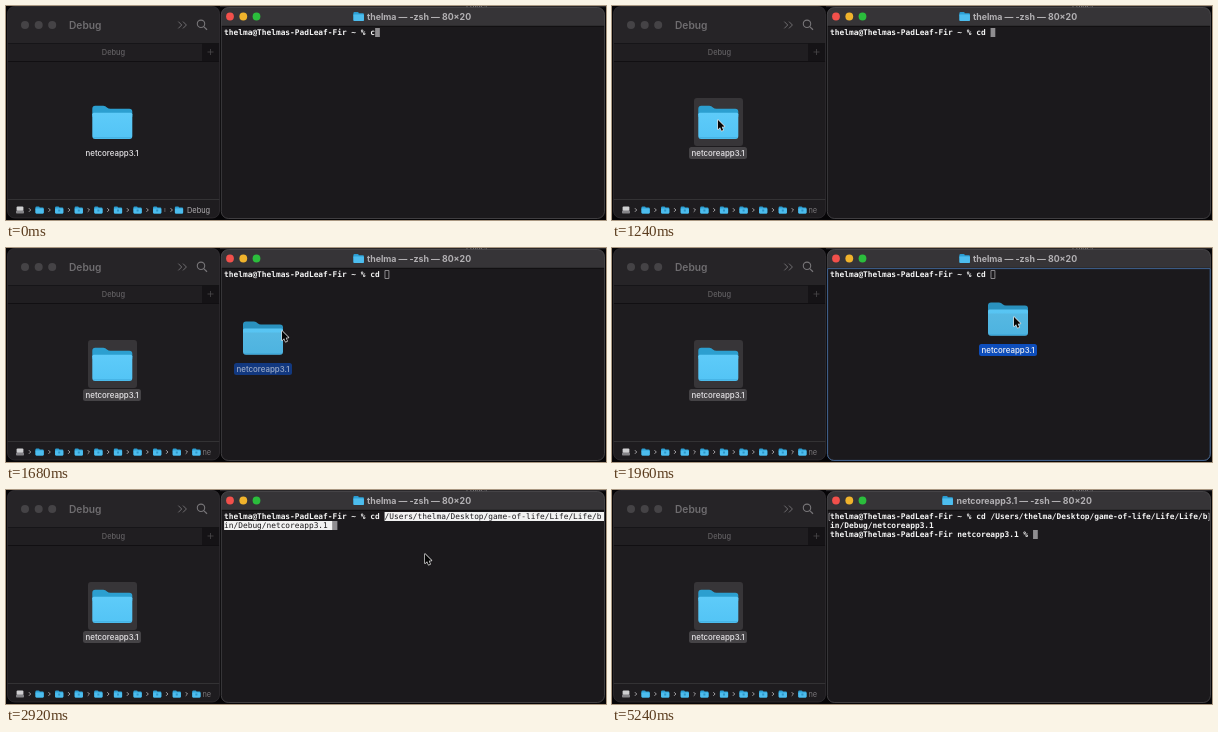
Recreate the animation shown at these times as an HTML page with a canvas. Size 600x214 px, loop 5280 ms.

```html
<!DOCTYPE html>
<html lang="en">
<head>
<meta charset="utf-8">
<title>Drag a folder into the terminal</title>
<style>
  html, body { margin: 0; width: 100%; height: 100%; overflow: hidden; background: #050506; }
  canvas { display: block; width: 600px; height: 214px; }
</style>
</head>
<body>
<canvas id="stage" width="600" height="214"></canvas>
<script>
const ctx = document.getElementById('stage').getContext('2d');
const LOOP = 5280, STEP = 40;
const UI = 'Inter, Roboto, sans-serif';
const MONO = '"DejaVu Sans Mono", "Liberation Mono", monospace';
const CELL = 4.72, ROW = 9, TEXT_X = 218.1, TEXT_Y = 22;

const USER = 'thelma';
const HOST = USER + '@Thelmas-PadLeaf-Fir';
const PROMPT = HOST + ' ~ % ';
const PATH_START = `/Users/${USER}/Desktop/game-of-life/Life/Life/b`;
const PATH_END = 'in/Debug/netcoreapp3.1';
const FOLDER = 'netcoreapp3.1';

// Moments of the story, in ms
const AT = { typeD: 80, typeSpace: 160, pointer: 240, select: 1080, drag: 1320,
             over: 1720, drop: 2440, enter: 3560, prompt: 3640 };

// Keys: [time, x, y]
const POINTER = [[240, 374, 88], [400, 318, 98], [600, 228, 110], [760, 158, 117], [920, 116, 116],
  [1160, 106, 114], [1280, 106, 114], [1400, 128, 110], [1520, 182, 99], [1680, 276, 83],
  [1800, 337, 75], [1960, 402, 69], [2120, 417, 66], [2280, 419, 64]];
const DRAGGED = [[1320, 106, 116], [1400, 117, 114], [1520, 160, 107], [1680, 257, 90],
  [1800, 322, 80], [1960, 396, 71], [2120, 415, 68], [2280, 418, 66]];

const clamp = v => Math.max(0, Math.min(1, v));

function along(keys, t) {
  let i = 0;
  while (i < keys.length - 2 && t > keys[i + 1][0]) i++;
  const [a, b] = [keys[i], keys[i + 1]];
  const u = clamp((t - a[0]) / (b[0] - a[0]));
  return [a[1] + (b[1] - a[1]) * u, a[2] + (b[2] - a[2]) * u];
}

function rect(x, y, w, h, fill) {
  ctx.fillStyle = fill;
  ctx.fillRect(x, y, w, h);
}

function round(x, y, w, h, r, fill, stroke, width = 1) {
  ctx.beginPath();
  ctx.roundRect(x, y, w, h, r);
  if (fill) { ctx.fillStyle = fill; ctx.fill(); }
  if (stroke) { ctx.strokeStyle = stroke; ctx.lineWidth = width; ctx.stroke(); }
}

function dot(x, y, r, fill) {
  ctx.beginPath();
  ctx.arc(x, y, r, 0, Math.PI * 2);
  ctx.fillStyle = fill;
  ctx.fill();
}

function line(points, color, width = 1) {
  ctx.beginPath();
  points.forEach(([x, y]) => ctx.lineTo(x, y));
  ctx.strokeStyle = color;
  ctx.lineWidth = width;
  ctx.stroke();
}

function text(str, x, y, font, color, align = 'left') {
  ctx.font = font;
  ctx.fillStyle = color;
  ctx.textAlign = align;
  ctx.textBaseline = 'alphabetic';
  ctx.fillText(str, x, y);
}

function chevron(x, y, size, color, width = 1) {
  line([[x - size / 2, y - size], [x + size / 2, y], [x - size / 2, y + size]], color, width);
}

function bigFolder(cx, cy) {
  const x = cx - 20, y = cy - 16.5;
  ctx.beginPath();
  ctx.moveTo(x, y + 3);
  ctx.quadraticCurveTo(x, y, x + 3, y);
  ctx.lineTo(x + 11, y);
  ctx.quadraticCurveTo(x + 13, y, x + 15, y + 2);
  ctx.quadraticCurveTo(x + 16, y + 3, x + 18, y + 3);
  ctx.lineTo(x + 37, y + 3);
  ctx.quadraticCurveTo(x + 40, y + 3, x + 40, y + 6);
  ctx.lineTo(x + 40, y + 11);
  ctx.lineTo(x, y + 11);
  ctx.fillStyle = '#2c9fd0';
  ctx.fill();
  const front = ctx.createLinearGradient(0, y + 7, 0, y + 33);
  front.addColorStop(0, '#5ecbf9');
  front.addColorStop(1, '#53c4f5');
  round(x, y + 7, 40, 26.2, [1.5, 1.5, 3, 3], front);
  rect(x + 1, y + 31.8, 38, 0.8, '#3aa6d8');
}

function smallFolder(cx, cy, w = 8.2) {
  const h = w * 0.84, x = cx - w / 2, y = cy - h / 2;
  round(x, y, w * 0.5, h * 0.5, 1, '#2b9bd0');
  round(x, y + h * 0.13, w, h * 0.87, 1, '#2fa3d8');
  round(x, y + h * 0.28, w, h * 0.72, 1, '#4dbdee');
}

function iconLabel(cx, cy, back, color) {
  if (back) round(cx - 29, cy - 6, 58, 12, 2.5, back);
  text(FOLDER, cx, cy + 2.9, `500 7.9px ${UI}`, color, 'center');
}

function drive(x, y) {
  round(x - 3.4, y - 3.6, 6.8, 4.6, 1, '#cfcfd1');
  round(x - 4, y + 0.4, 8, 3.2, 0.8, '#858488');
}

function pathBar(selected) {
  const y = 204, gap = 19.6, grey = '#a5a3a6';
  drive(14, y);
  ctx.save();
  ctx.beginPath();
  ctx.rect(2, 194, 204, 18);
  ctx.clip();
  const folders = selected ? 9 : 7;
  for (let i = 1; i <= folders; i++) {
    const x = 14 + gap * i;
    chevron(x - 9.8, y, 1.8, grey);
    smallFolder(x, y);
    if (i > 1) rect(x - 1, y - 0.5, 2, 2, '#2f94c6');
  }
  const font = `7.4px ${UI}`;
  if (selected) {
    text('ne', 196.5, y + 2.7, font, '#777578');
  } else {
    rect(158.5, y - 2, 0.8, 4, '#6b696c');
    chevron(165.5, y, 1.8, grey);
    smallFolder(173, y);
    text('Debug', 181, y + 2.7, font, '#b0aeb1');
  }
  ctx.restore();
}

function finder(t) {
  const selected = t >= AT.select;
  round(1.5, 0.5, 212, 211.5, 7, '#1e1c1f');
  round(1.5, 0.5, 212, 37, [7, 7, 0, 0], '#262427');
  rect(1.5, 37, 212, 18, '#201e21');
  rect(196, 37, 17.5, 18, '#151316');
  rect(1.5, 37, 212, 0.8, '#151316');
  rect(1.5, 55, 212, 0.8, '#0e0c0f');
  for (const x of [19, 32.7, 46.2]) dot(x, 19, 4, '#454346');
  text('Debug', 63, 22.7, `600 10.2px ${UI}`, '#6f6d70');
  chevron(174, 19, 3.4, '#6f6d70');
  chevron(178.7, 19, 3.4, '#6f6d70');
  ctx.beginPath();
  ctx.arc(195, 17.8, 3.7, 0, Math.PI * 2);
  ctx.strokeStyle = '#777578';
  ctx.lineWidth = 1.1;
  ctx.stroke();
  line([[197.7, 20.6], [201, 23.8]], '#777578', 1.2);
  text('Debug', 107.5, 48.7, `500 7.4px ${UI}`, '#626063', 'center');
  line([[201.5, 46], [207.5, 46]], '#4a484b', 0.8);
  line([[204.5, 43], [204.5, 49]], '#4a484b', 0.8);

  if (selected) round(82, 92, 49, 48, 3, '#373538');
  bigFolder(106.3, 116.2);
  iconLabel(106, 147, selected && '#454346', '#e6e4e7');

  rect(1.5, 193, 212, 0.8, '#39373a');
  pathBar(selected);
  round(1.5, 0.5, 212, 211.5, 7, null, '#343235', 0.7);
}

function row(str, n, color = '#f4f4f4', weight = 'bold', col = 0) {
  text(str, TEXT_X + col * CELL, TEXT_Y + n * ROW + 7,
    `${weight} ${CELL / 0.602}px ${MONO}`, color);
}

function block(col, n, hollow) {
  const x = TEXT_X + col * CELL, y = TEXT_Y + n * ROW;
  if (hollow) {
    ctx.strokeStyle = '#979598';
    ctx.lineWidth = 0.9;
    ctx.strokeRect(x + 0.4, y + 0.5, CELL - 0.8, ROW - 1);
  } else rect(x, y, CELL, ROW, '#8f8d90');
}

function shell(t) {
  const command = t < AT.typeD ? 'c' : t < AT.typeSpace ? 'cd' : 'cd ';
  row(PROMPT + command, 0);
  const start = PROMPT.length + 3;
  if (t < AT.drop) {
    block(PROMPT.length + command.length, 0, t >= AT.drag);
  } else if (t < AT.enter) {
    rect(TEXT_X + start * CELL, TEXT_Y, 598 - TEXT_X - start * CELL, ROW, '#f2f2f2');
    rect(TEXT_X, TEXT_Y + ROW, (PATH_END.length + 1) * CELL, ROW, '#f2f2f2');
    row(PATH_START, 0, '#1b191c', 'normal', start);
    row(PATH_END, 1, '#1b191c', 'normal');
    block(PATH_END.length + 1, 1, false);
  } else {
    row(PATH_START, 0, '#f4f4f4', 'bold', start);
    row(PATH_END, 1);
    line([[218.2, 23.3], [217, 23.3], [217, 30.5], [218.2, 30.5]], '#a09ea1', 0.8);
    line([[596, 23.3], [597.2, 23.3], [597.2, 30.5], [596, 30.5]], '#a09ea1', 0.8);
    if (t < AT.prompt) return block(0, 2, false);
    const prompt = `${HOST} ${FOLDER} % `;
    row(prompt, 2);
    block(prompt.length, 2, false);
  }
}

function terminal(t) {
  const x = 215.3, y = 1.5, w = 383.2, h = 211;
  round(x, y, w, h, 7, '#1b191c');
  round(x, y, w, 18.5, [7, 7, 0, 0], '#363437');
  rect(x, 19.8, w, 0.8, '#0c0a0d');
  dot(224, 10.5, 3.9, '#f2504b');
  dot(237.3, 10.5, 3.9, '#f0b32c');
  dot(250.5, 10.5, 3.9, '#2bbd3c');

  const moved = t >= AT.prompt;
  smallFolder(moved ? 335.7 : 352.7, 10.5, 10.5);
  text(`${moved ? FOLDER : USER} — -zsh — 80×20`, moved ? 344.5 : 361, 13.7,
    `bold 8.8px ${UI}`, '#b2b0b3');
  shell(t);

  round(x, y, w, h, 7, null, '#545255', 0.7);
  if (t >= AT.over && t < AT.drop) {
    round(x + 0.3, 20.6, w - 0.6, h - 19.2, [0, 0, 6, 6], null, '#3f6290', 1);
  }
}

function draggedFolder(t) {
  if (t < AT.drag || t >= AT.drop) return;
  const [x, y] = along(DRAGGED, t);
  ctx.save();
  ctx.globalAlpha = 0.9;
  bigFolder(x, y);
  ctx.globalAlpha = 0.62 + 0.38 * clamp((t - 1680) / 160);
  iconLabel(x, y + 31, '#0d4dbb', '#f0f0f2');
  ctx.restore();
}

function pointer(t) {
  if (t < AT.pointer || t >= AT.enter) return;
  const [x, y] = along(POINTER, t);
  ctx.beginPath();
  [[0, 0], [0, 9.2], [2.1, 7.3], [3.6, 10.8], [5.1, 10.1], [3.7, 6.8], [6.5, 6.5]]
    .forEach(([dx, dy]) => ctx.lineTo(x + dx, y + dy));
  ctx.closePath();
  ctx.lineJoin = 'round';
  ctx.lineWidth = 1.4;
  ctx.strokeStyle = '#dddddd';
  ctx.stroke();
  ctx.fillStyle = '#050505';
  ctx.fill();
}

function draw(t) {
  rect(0, 0, 600, 214, '#060507');
  rect(214, 0, 386, 1.2, '#29272a');
  text('Folder', 460, 2, `7.4px ${UI}`, '#8a888b');
  finder(t);
  terminal(t);
  draggedFolder(t);
  pointer(t);
}

const begin = performance.now();
function tick() {
  const t = (performance.now() - begin) % LOOP;
  draw(Math.floor(t / STEP) * STEP);
  requestAnimationFrame(tick);
}
tick();
</script>
</body>
</html>
```
